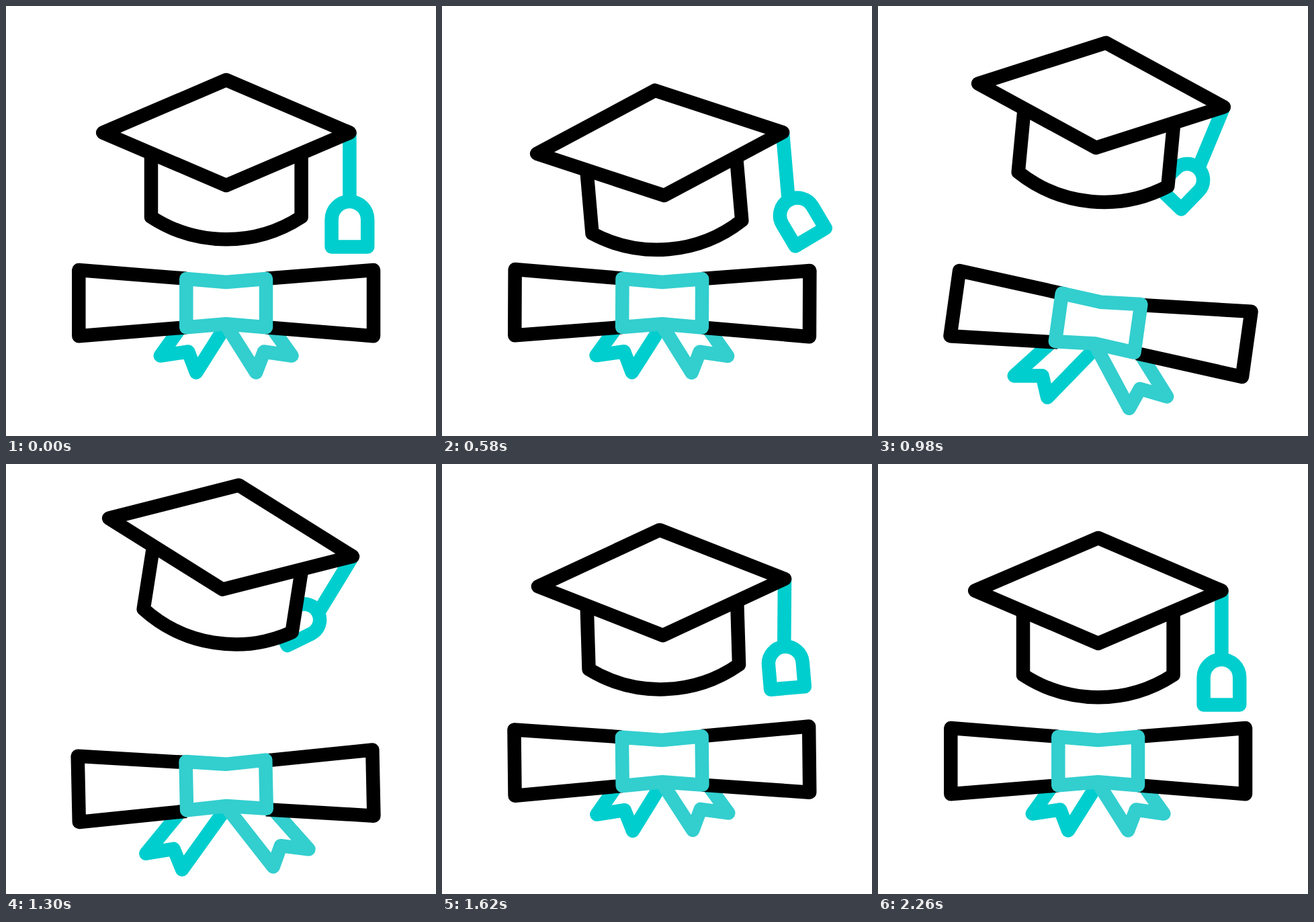
Recreate the animation shown at these times as an HTML page. Size 640 by 640 pixels, loop 2.4 s.

```html
<!DOCTYPE html>
<html lang="en">
<head>
<meta charset="utf-8">
<title>Graduation cap and diploma</title>
<style>
  html, body { margin: 0; width: 100%; height: 100%; overflow: hidden; background: #fff; }
  svg { display: block; width: 100vw; height: 100vh; }
  path { fill: #fff; stroke: #000; stroke-width: 20.5; stroke-linejoin: round; }
  .teal { stroke: #00cece; }
  .soft { stroke: #33cece; }
</style>
</head>
<body>
<svg viewBox="0 0 640 640">
  <path id="ribbonL" class="teal"/>
  <path id="ribbonR" class="soft"/>
  <g id="scroll">
    <path d="M268.3 405.7 L108.3 393 V491.2 L268.3 478.3"/>
    <path d="M387 405.7 L547 393 V491.2 L387 478.3"/>
  </g>
  <path id="knot" class="soft" d="M268.3 406 L327.6 411 L387 406 V478.3 L327.6 473.2 L268.3 478.3 Z"/>
  <g id="cap">
    <g id="tassel">
      <path id="cord" class="teal"/>
      <path id="bell" class="teal"/>
    </g>
    <path d="M216 219 V314 A204.5 204.5 0 0 0 439.6 314 V219"/>
    <path d="M327.7 110 L511.5 188.5 L327.7 267 L144.2 188.5 Z"/>
  </g>
</svg>
<script>
const LOOP = 2400, STEP = 20;

// Times at which each part reaches its poses: rest, dip, peak, dip, rest.
const CAP = [200, 600, 1200, 1800, 2200];
const TASSEL = [270, 600, 1180, 1800, 2260];
const ROCK = [540, 920, 1440, 1800, 2200];
const RISE = [600, 1200, 1600];

const el = id => document.getElementById(id);
const smooth = u => u * u * (3 - 2 * u);

function pose(t, times, values) {
  const i = times.findIndex(time => t < time);
  if (i === 0) return values[0];
  if (i < 0) return values[values.length - 1];
  const u = (t - times[i - 1]) / (times[i] - times[i - 1]);
  return values[i - 1] + (values[i] - values[i - 1]) * smooth(u);
}

function place(id, transform) {
  el(id).setAttribute("transform", transform);
}

function shape(id, d) {
  el(id).setAttribute("d", d);
}

// The loose end of a ribbon slides outwards; side is -1 or 1.
function ribbon(side, stretch) {
  const x = d => 327.6 + side * d;
  const out = d => x(d + stretch);
  const drop = stretch * 0.85;
  return `M${x(66)} 476 L${out(97.8)} ${520.5 + drop}` +
    ` L${out(56.4)} ${514.5 + drop} L${out(44.5)} ${545.5 + drop} L${x(0)} 475`;
}

function drawCap(t) {
  const y = pose(t, CAP, [0, 15.3, -87, 8.8, 0]);
  const turn = pose(t, CAP, [0, -5, 10, -5, 0]);
  place("cap", `translate(0 ${y}) rotate(${turn} 327.8 232)`);
}

function drawTassel(t) {
  const cordTurn = pose(t, CAP, [0, 0, 24.6, -4, 0]);
  const bellTurn = pose(t, TASSEL, [0, -26, 63, -20, 0]);
  const swing = pose(t, TASSEL, [0, 0.2, 1, 0.2, 0]);

  // The tassel narrows as it swings under the cap.
  const length = 102.5 - 4.5 * swing;
  const r = 26.8 * (1 - 0.14 * swing);
  const base = r + 40.7 * (1 - 0.45 * swing * (1 - swing));

  place("tassel", `translate(511.4 188.5) rotate(${cordTurn})`);
  shape("cord", `M0 0 V${length}`);
  place("bell", `translate(0 ${length}) rotate(${bellTurn - cordTurn})`);
  shape("bell", `M${-r} ${r} A${r} ${r} 0 0 1 ${r} ${r} V${base} H${-r} Z`);
}

function drawScroll(t) {
  const y = pose(t, RISE, [0, 44, 0]);
  const turn = pose(t, ROCK, [0, 8.4, -3.3, 2, 0]);
  const low = `translate(0 ${y}) rotate(${turn} 327.6 470)`;
  const centred = `translate(0 ${y * 0.965}) rotate(${turn} 327.6 442)`;
  place("scroll", low);
  place("ribbonL", low);
  place("ribbonR", centred);
  place("knot", centred);
  shape("ribbonL", ribbon(-1, y * 0.62));
  shape("ribbonR", ribbon(1, y * 0.62));
}

const start = performance.now();
function tick() {
  const now = (performance.now() - start) % LOOP;
  const t = Math.floor(now / STEP) * STEP;
  drawCap(t);
  drawTassel(t);
  drawScroll(t);
  requestAnimationFrame(tick);
}
tick();
</script>
</body>
</html>
```
